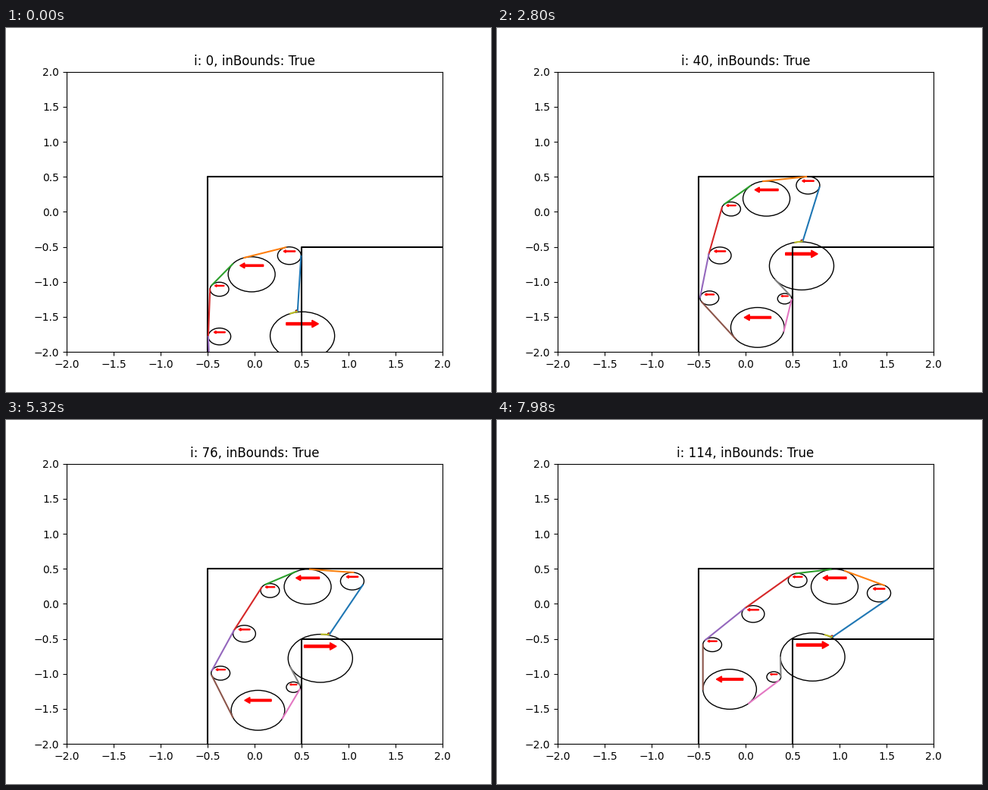
Recreate the animation shown at these times as a matplotlib script. Size 640x480 px, loop 8 s.

```python
import numpy as np
import matplotlib.pyplot as plt
from matplotlib.animation import FuncAnimation
from matplotlib.patches import Circle, Polygon

LOOP_MS = 8000
FRAMES = 115
LIFT = 10          # frames of straight upward travel before the turn
STEP_UP = 0.1
STEP_TURN = 0.01   # radians, clockwise

# Rigid ring of rollers (x, y, radius), counter-clockwise, relative to the
# last one, which is the pivot. A negative radius spins clockwise.
ROLLERS = np.array([
    (-.061, .356, .01), (-.139, 1.144, .125), (-.540, .878, .25),
    (-.883, .665, .1), (-.882, -.009, .12), (-.883, -.626, .1),
    (-.304, -.948, .285), (-.094, -.493, .075), (0, 0, -.343),
])
SHAPE, RADII = ROLLERS[:, :2], ROLLERS[:, 2]

# Stages of the turn: the pivot drifts while the number of turn steps grows.
TIMES = [10, 16, 30, 50, 76, 100, 114]
TURNS = [0, 4, 12, 25, 42, 66, 78]
PIVOT_X = [.509, .523, .571, .622, .700, .700, .714]
PIVOT_Y = [-.770, -.774, -.777, -.767, -.778, -.778, -.759]

# Unit arrow outline, pointing right
ARROW = np.array([(0, .1), (0, -.1), (.8, -.1), (.8, -.3),
                  (1, 0), (.8, .3), (.8, .1)])


def centres(i):
    """Roller centres at frame i: lifted, then turned about the drifting pivot."""
    drop = STEP_UP * max(LIFT - i, 0)
    pivot = [np.interp(i, TIMES, PIVOT_X), np.interp(i, TIMES, PIVOT_Y) - drop]
    a = STEP_TURN * np.round(np.interp(i, TIMES, TURNS))
    turn = np.array([[np.cos(a), -np.sin(a)], [np.sin(a), np.cos(a)]])
    return pivot + SHAPE @ turn


def tangent(p, q, rp, rq):
    """Belt segment running from roller p to roller q."""
    d = q - p
    length = np.hypot(*d)
    u = d / length
    right = np.array([u[1], -u[0]])
    k = np.clip((rp - rq) / length, -1, 1)
    n = k * u + np.sqrt(1 - k * k) * right
    return p + rp * n, q + rq * n


def spin_arrow(c, r):
    """Arrow above the centre, pointing the way the top of the roller moves."""
    tail = c + [r / 2, abs(r) / 2]
    return tail + ARROW * [-r, abs(r) / 2]


fig, ax = plt.subplots(figsize=(6.4, 4.8), dpi=100)
ax.set(xlim=(-2, 2), ylim=(-2, 2))
title = ax.set_title("")

for x, y in [(-.5, .5), (.5, -.5)]:
    ax.plot([x, x, 2], [-2, y, y], "k")

circles, arrows, belts = [], [], []
for j, r in enumerate(RADII):
    circles.append(ax.add_patch(Circle((0, 0), abs(r), fill=False)))
    arrows.append(ax.add_patch(Polygon(ARROW, color="red")))
    belts += ax.plot([], [], color=f"C{j}")


def update(i):
    pts = centres(i)
    for j, r in enumerate(RADII):
        nxt = (j + 1) % len(RADII)
        circles[j].center = pts[j]
        arrows[j].set_xy(spin_arrow(pts[j], r))
        # belt j arrives at roller j, so the first one closes the ring
        belts[j].set_data(*np.transpose(
            tangent(pts[j], pts[nxt], r, RADII[nxt])))
    title.set_text(f"i: {i}, inBounds: True")
    return [title, *circles, *arrows, *belts]


anim = FuncAnimation(fig, update, frames=FRAMES, interval=LOOP_MS / FRAMES,
                     repeat=True, repeat_delay=0, blit=False)
plt.show()
```
